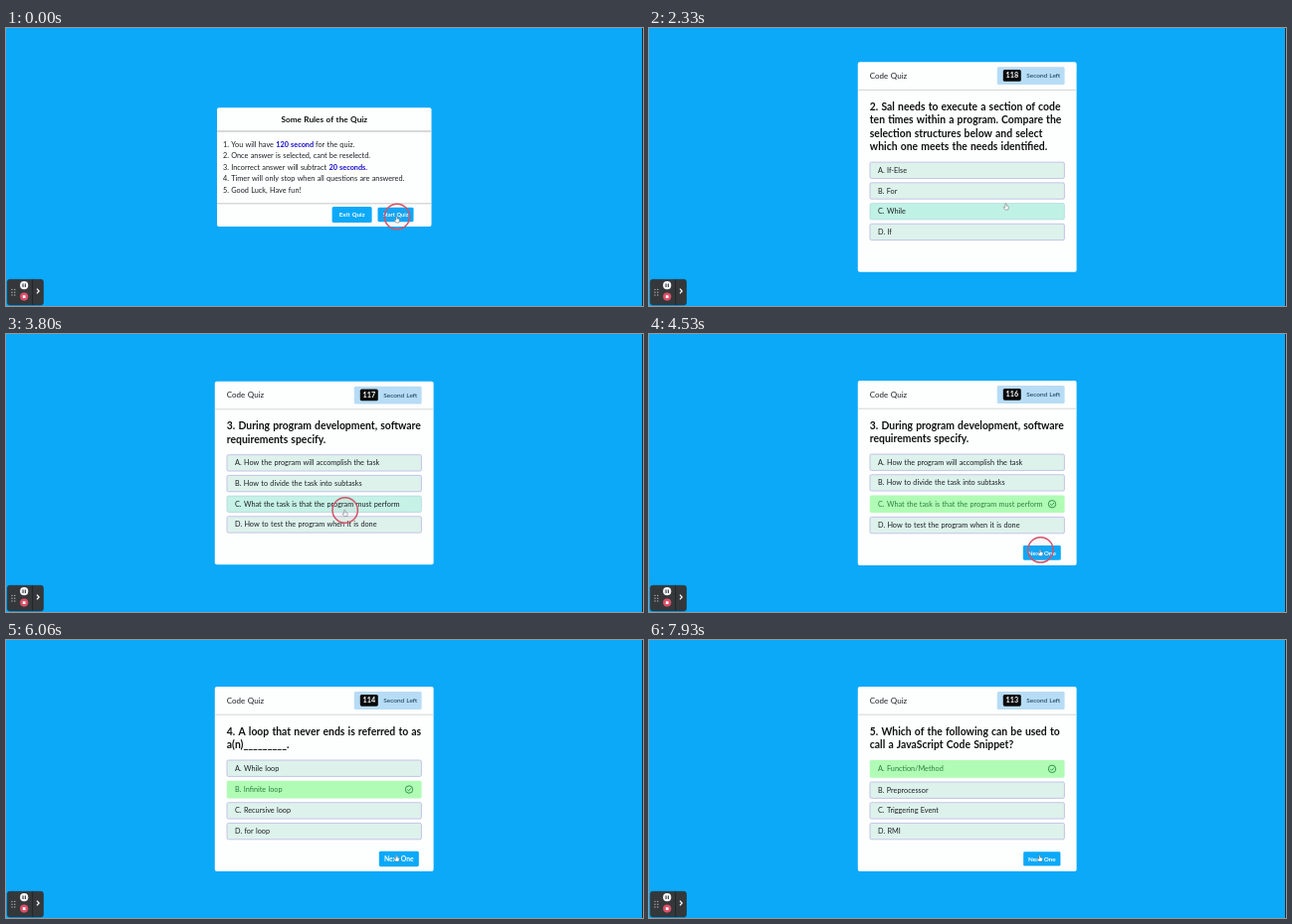
Write an HTML page with a canvas that moves like this. It is 640 px wide and 280 px high and loops after 8 s.

```html
<!DOCTYPE html>
<html lang="en">
<head>
<meta charset="utf-8">
<title>Code Quiz</title>
<style>
  html, body { margin: 0; width: 100%; height: 100%; overflow: hidden; background: #0ca9f9; }
  canvas { display: block; width: 640px; height: 280px; }
</style>
</head>
<body>
<canvas id="stage"></canvas>
<script>
const LOOP = 8000, BLUE = '#0ca9f9', INK = '#1c1f22';
const canvas = document.getElementById('stage');
const ctx = canvas.getContext('2d');
const ratio = window.devicePixelRatio || 1;
canvas.width = 640 * ratio;
canvas.height = 280 * ratio;

const questions = [
  { start: 60, answered: 1070, pick: 3,
    lines: ['1. _______ is the process of finding errors', 'and fixing them within a program.'],
    options: ['Compiling', 'Executing', 'Scanning', 'Debugging'] },
  { start: 1830, answered: 2700, pick: 1,
    lines: ['2. Sal needs to execute a section of code', 'ten times within a program. Compare the',
            'selection structures below and select', 'which one meets the needs identified.'],
    options: ['If-Else', 'For', 'While', 'If'] },
  { start: 3220, answered: 3860, pick: 2,
    lines: ['3. During program development, software', 'requirements specify.'],
    options: ['How the program will accomplish the task', 'How to divide the task into subtasks',
              'What the task is that the program must perform', 'How to test the program when it is done'] },
  { start: 4560, answered: 5400, pick: 1,
    lines: ['4. A loop that never ends is referred to as', 'a(n)_________.'],
    options: ['While loop', 'Infinite loop', 'Recursive loop', 'for loop'] },
  { start: 6330, answered: 7130, pick: 0,
    lines: ['5. Which of the following can be used to', 'call a JavaScript Code Snippet?'],
    options: ['Function/Method', 'Preprocessor', 'Triggering Event', 'RMI'] },
];

const rules = [
  ['You will have ', '120 second', ' for the quiz.'],
  ['Once answer is selected, cant be reselectd.'],
  ['Incorrect answer will subtract ', '20 seconds.'],
  ['Timer will only stop when all questions are answered.'],
  ['Good Luck, Have fun!'],
];

// Pointer path: time, x, y of the tip
const path = [
  [0, 392.5, 190], [250, 392, 190], [820, 370, 190], [1400, 369, 188.5], [1680, 394, 218],
  [1880, 393, 217], [2060, 368, 190], [2330, 358.5, 177], [2450, 352, 164], [2680, 352, 164],
  [3040, 393, 218], [3280, 393, 218], [3600, 341, 178], [4020, 339.5, 177], [4380, 393, 218],
  [4650, 393, 217], [4800, 352, 176], [5060, 347, 166], [5130, 345.5, 160.5], [5270, 342, 153],
  [5560, 342, 153], [6100, 393, 218], [6640, 393, 217], [6800, 327, 141], [6860, 323, 136],
  [7000, 321, 131], [7300, 321, 131], [7600, 392.5, 217], [8000, 392.5, 217],
];
const clicks = [-50, 980, 1740, 2610, 3120, 3740, 4460, 5320, 6230, 7050];

const clamp = v => Math.min(1, Math.max(0, v));
const smooth = v => (v = clamp(v), v * v * (3 - 2 * v));
const mix = (a, b, k) => 'rgb(' + a.map((v, i) => v + (b[i] - v) * k) + ')';

function cursorAt(t) {
  const i = Math.max(1, path.findIndex(p => p[0] >= t));
  const [t0, x0, y0] = path[i - 1], [t1, x1, y1] = path[i];
  const k = smooth((t - t0) / (t1 - t0));
  return [x0 + (x1 - x0) * k, y0 + (y1 - y0) * k];
}

function isOver(t, x, y, w, h) {
  const [cx, cy] = cursorAt(t);
  return cx >= x && cx <= x + w && cy >= y && cy <= y + h;
}

// Share of the last 300 ms spent over a box, standing in for a CSS transition
function hover(t, ...area) {
  let sum = 0;
  for (let k = 0; k < 6; k++) sum += isOver(Math.max(0, t - k * 50), ...area);
  return sum / 6;
}

function box(x, y, w, h, r, fill, stroke) {
  ctx.beginPath();
  ctx.roundRect(x, y, w, h, r);
  ctx.fillStyle = fill;
  ctx.fill();
  if (stroke) {
    ctx.strokeStyle = stroke;
    ctx.lineWidth = 0.6;
    ctx.stroke();
  }
}

function text(str, x, y, size, color = INK, weight = 400, align = 'left') {
  ctx.font = `${weight} ${size}px Lato, sans-serif`;
  ctx.wordSpacing = size * 0.06 + 'px';
  ctx.textAlign = align;
  ctx.fillStyle = color;
  ctx.fillText(str, x, y);
  return ctx.measureText(str).width;
}

function circle(x, y, r, fill, stroke, width) {
  ctx.beginPath();
  ctx.arc(x, y, r, 0, 7);
  if (fill) { ctx.fillStyle = fill; ctx.fill(); }
  if (stroke) { ctx.strokeStyle = stroke; ctx.lineWidth = width; ctx.stroke(); }
}

function polyline(points, color, width) {
  ctx.beginPath();
  points.forEach(p => ctx.lineTo(...p));
  ctx.strokeStyle = color;
  ctx.lineWidth = width;
  ctx.stroke();
}

// Runs draw scaled around a centre, with opacity
function layer(cx, cy, scale, alpha, draw) {
  if (alpha <= 0) return;
  ctx.save();
  ctx.translate(cx, cy);
  ctx.scale(scale, scale);
  ctx.translate(-cx, -cy);
  ctx.globalAlpha *= alpha;
  draw();
  ctx.restore();
}

function button(label, cx, cy, w, size, scale = 1, alpha = 1) {
  layer(cx, cy, scale, alpha, () => {
    box(cx - w / 2, cy - 8, w, 16, 1.6, BLUE);
    text(label, cx, cy + 2.4, size, '#fff', 700, 'center');
  });
}

function drawRules(t) {
  box(212, 80.3, 215.5, 119.7, 2, '#fdfefe');
  text('Some Rules of the Quiz', 319.8, 94.8, 8.2, '#111', 700, 'center');
  box(212, 103.6, 215.5, 0.8, 0, '#b5b5b5');
  box(212, 176.4, 215.5, 0.8, 0, '#b5b5b5');
  rules.forEach((parts, i) => {
    const y = 119.6 + i * 11.6;
    let x = 218 + text(i + 1 + '. ', 218, y, 7.3);
    parts.forEach((part, k) => {
      x += k === 1 ? text(part, x, y, 7.3, '#1a10c8', 700) : text(part, x, y, 7.3);
    });
  });
  button('Exit Quiz', 347.6, 188, 40, 6.3);
  button('Start Quiz', 391.5, 188, 40, 6.3, 1 - 0.1 * hover(t, 372, 180, 40, 16));
}

function drawQuestion(t, q) {
  const done = t >= q.answered;
  const grow = done ? 1.3 : 0;
  const extra = (q.lines.length - 2) * 13.5;
  const height = 184.5 + extra + grow;
  const top = 140 - height / 2;

  box(209.8, top, 219.8, height, 2, '#fdfefe');
  text('Code Quiz', 221.8, top + 16.7, 8);
  box(209.8, top + 27.7, 219.8, 0.8, 0, '#c6c9cb');
  box(349.8, top + 5, 67.8, 17.8, 1.5, '#b7dcf5');
  box(355.8, top + 7.8, 18, 11.8, 1.6, '#08090a');
  text(120 - Math.floor(t / 1000), 364.8, top + 16.2, 7.2, '#fff', 700, 'center');
  text('Second Left', 379.3, top + 16.2, 6.5, '#12354f');

  q.lines.forEach((line, i) => text(line, 221.8, top + 48.7 + i * 13.5, 10.4, '#111', 700));

  const firstY = top + 73.9 + extra;
  let y = firstY;
  q.options.forEach((option, i) => {
    const label = 'ABCD'[i] + '. ' + option;
    const chosen = done && i === q.pick;
    const h = chosen ? 16.4 + grow : 16.4;
    if (chosen) {
      box(221.8, y, 195.8, h, 1.6, '#b0fcb5');
      circle(405, y + h / 2, 3.7, null, '#238c3c', 0.9);
      polyline([[403.2, y + h / 2], [404.6, y + h / 2 + 1.4], [407, y + h / 2 - 1.3]], '#238c3c', 0.9);
    } else {
      const k = done ? 0 : hover(t, 221.8, y, 195.8, h);
      box(222, y, 195.4, h, 1.6, mix([222, 242, 236], [192, 241, 229], k),
          mix([168, 162, 224], [170, 212, 222], k));
    }
    text(label, 230, y + h / 2 + 2.5, 7.3, chosen ? '#2c8040' : INK);
    y += h + 4.3;
  });

  const cy = top + height - 12.5;
  const nextArea = [374, cy - 8, 41.5, 16];
  const shown = smooth((t - q.answered) / 300);
  const scale = 0.9 + 0.1 * shown * (1 - hover(t, ...nextArea));
  button('Next One', 394.8, cy, 41.4, 7, scale, shown);

  return done ? isOver(t, ...nextArea)
    : q.options.some((_, i) => isOver(t, 221.8, firstY + i * 20.7, 195.8, 16.4));
}

function drawRecorder() {
  box(1.3, 253.3, 36.2, 25.7, 2.5, '#35383b', '#26353d');
  box(26.3, 253.3, 0.8, 25.7, 0, '#1f2225');
  for (let i = 0; i < 6; i++) circle(6 + (i % 2) * 2.8, 263.4 + (i >> 1) * 2.8, 0.7, '#b4b8bb');
  circle(18.2, 259.2, 4.1, '#f4f6f7');
  box(16.5, 257.4, 1.1, 3.6, 0, '#34383d');
  box(18.8, 257.4, 1.1, 3.6, 0, '#34383d');
  circle(18.2, 270.6, 4.1, '#dd4f67');
  box(16.8, 269.2, 2.8, 2.8, 0.4, '#fff');
  polyline([[31, 262.6], [33.2, 265], [31, 267.4]], '#fff', 1.2);
}

const hand = new Path2D('M-.6 0Q0-.7 .6 0V2L2.6 2.5Q3 2.7 2.9 3.4L2.4 6H-.8L-2.4 3.6Q-2 2.9-.6 3.6Z');
const arrow = new Path2D('M-.5-.5V4.5L.7 3.4 1.5 5.2 2.4 4.8 1.6 3.1H3.1Z');

function drawCursor(t, pointing) {
  const [x, y] = cursorAt(t);
  const click = clicks.find(c => t >= c && t < c + 380);
  if (click !== undefined) {
    ctx.globalAlpha = clamp((click + 380 - t) / 100);
    circle(x + 0.4, y, 12.7, 'rgba(220,70,90,.04)', '#d25468', 1.5);
    ctx.globalAlpha = 1;
  }
  ctx.save();
  ctx.translate(x, y);
  const shape = pointing ? hand : arrow;
  ctx.fillStyle = '#fff';
  ctx.strokeStyle = '#5d6669';
  ctx.lineWidth = 0.5;
  ctx.fill(shape);
  ctx.stroke(shape);
  ctx.restore();
}

function render(t) {
  ctx.setTransform(ratio, 0, 0, ratio, 0, 0);
  box(0, 0, 640, 280, 0, BLUE);
  box(639, 0, 1, 280, 0, '#22282c');

  const open = smooth((t - 60) / 300);
  let pointing = true;
  layer(320, 140, 1 - 0.1 * open, 1 - open, () => drawRules(t));
  const current = questions.filter(q => t >= q.start).pop();
  if (current) {
    layer(320, 140, 0.9 + 0.1 * open, open, () => { pointing = drawQuestion(t, current); });
  }
  drawRecorder();
  drawCursor(t, pointing);
}

const began = performance.now();
function tick() {
  render((performance.now() - began) % LOOP);
  requestAnimationFrame(tick);
}
tick();
</script>
</body>
</html>
```
